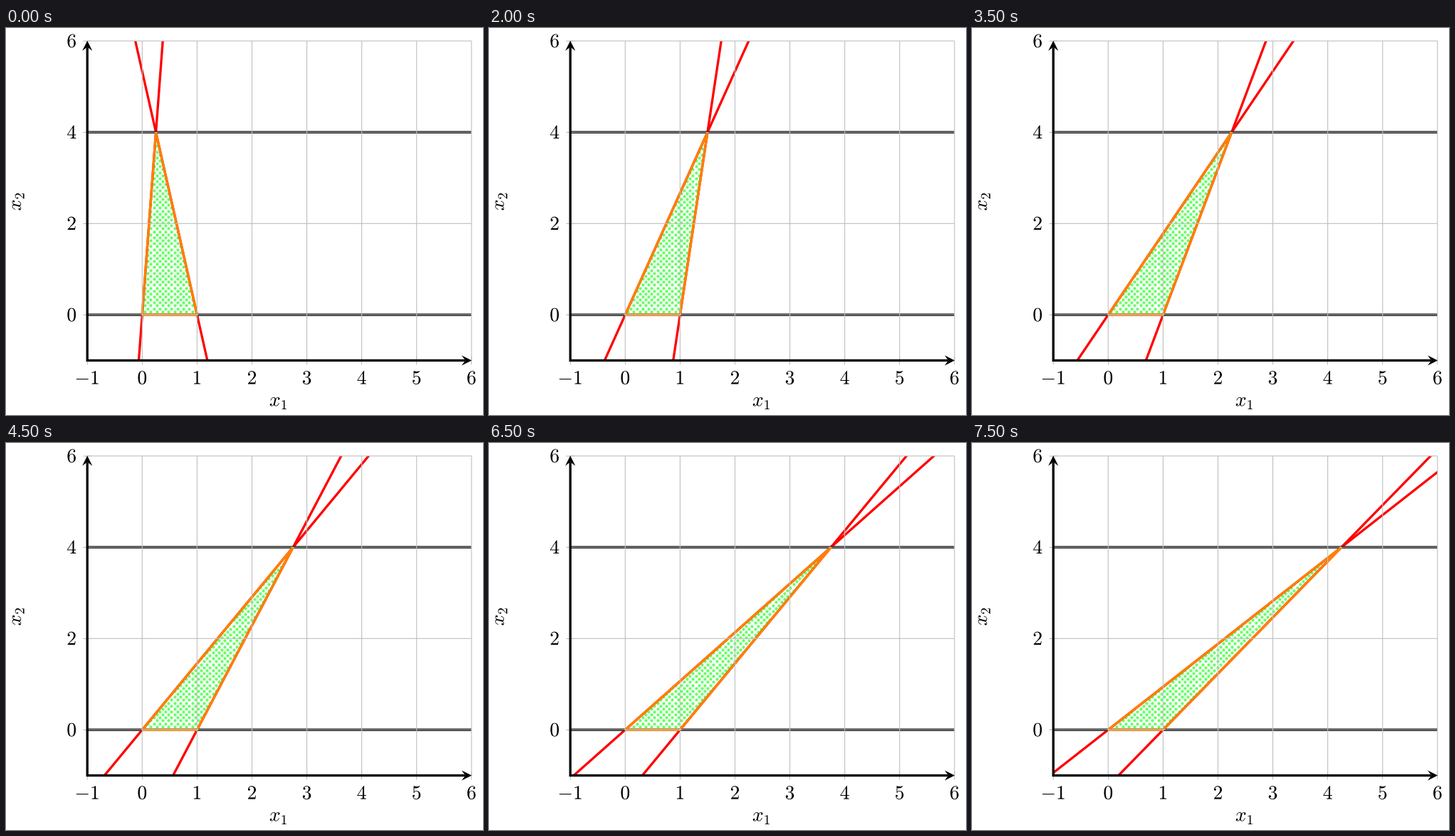
A matplotlib script that plays this animation: 670 by 543 pixels, repeating every 8000 ms.

```python
import numpy as np
import matplotlib.pyplot as plt
from matplotlib.animation import FuncAnimation
from matplotlib.patches import PathPatch, Polygon, Rectangle
from matplotlib.path import Path
from matplotlib.textpath import TextPath
from matplotlib.transforms import Affine2D

W, H, DPI = 670, 543, 100
PX = 72 / DPI                  # one pixel in points
PT = 200 / 72.27               # one TeX point in pixels
LEFT, TOP = 114.2, 18.15
RIGHT, BOTTOM = LEFT + 195 * PT, TOP + 162 * PT
THICK, THIN, HAIR = 1.2 * PT, 0.4 * PT, 0.2 * PT
GRID = "#bfbfbf"

# Apex positions; x = 1 is skipped because one side would be vertical.
APEX = [k / 4 for k in range(1, 18) if k != 4]

plt.rcParams["mathtext.fontset"] = "cm"
fig = plt.figure(figsize=(W / DPI, H / DPI), dpi=DPI, facecolor="white")
ax = fig.add_axes([0, 0, 1, 1])
ax.set_xlim(0, W)
ax.set_ylim(H, 0)
ax.axis("off")


def sx(x):
    return LEFT + (x + 1) * (RIGHT - LEFT) / 7


def sy(y):
    return BOTTOM - (y + 1) * (BOTTOM - TOP) / 7


def line(xs, ys, color, width, z):
    return ax.plot(xs, ys, color=color, lw=width * PX, zorder=z, snap=False,
                   solid_capstyle="butt", solid_joinstyle="bevel")[0]


def label(x, y, s, rotation=0):
    """Draw math text with its baseline starting at (x, y)."""
    glyphs = TextPath((0, 0), f"${s}$", size=10 * PT)
    place = Affine2D().scale(1, -1).rotate_deg(-rotation).translate(x, y)
    ax.add_patch(PathPatch(place.transform_path(glyphs), fc="black",
                           ec="none", snap=False, zorder=9))


def arrow_tip(x, y, dx, dy):
    u = 0.64 * PT
    shape = [(0, 0), (-8, 4), (-5, 0), (-8, -4)]
    pts = [(x + u * (a * dx - b * dy), y + u * (a * dy + b * dx))
           for a, b in shape]
    ax.add_patch(Polygon(pts, fc="black", ec="none", snap=False, zorder=8))


# Dotted fill: two interleaved square lattices.
step = 3 * PT
i, j = np.meshgrid(np.arange(22, 66), np.arange(16, 50))
gx, gy = i.ravel() * step, H - j.ravel() * step
dots = ax.scatter(np.r_[gx, gx + step / 2], np.r_[gy, gy - step / 2],
                  s=(4.2 * PX) ** 2, c="#66ff66", linewidths=0, zorder=1)

# Moving lines and the fixed horizontal bounds
box = Rectangle((LEFT, TOP), RIGHT - LEFT, BOTTOM - TOP, transform=ax.transData)
sides = [line([], [], "#ff0000", THICK, 2) for _ in range(2)]
for side in sides:
    side.set_clip_path(box)
for y in (0, 4):
    line([LEFT, RIGHT], [sy(y)] * 2, "black", THICK, 3)
outline = line([], [], "#ff8000", THICK, 4)

# Grid, ticks and labels
half = 2.13 * PT
digit, minus = 5 * PT, 7.78 * PT
for x in range(-1, 7):
    line([sx(x)] * 2, [BOTTOM - half, BOTTOM + half], "gray", HAIR, 5)
    line([sx(x)] * 2, [TOP, BOTTOM], GRID, THIN, 6)
    label(sx(x) - (digit + minus * (x < 0)) / 2, 499.7, x)
for y in (0, 2, 4, 6):
    line([LEFT - half, LEFT + half], [sy(y)] * 2, "gray", HAIR, 5)
    line([LEFT, RIGHT], [sy(y)] * 2, GRID, THIN, 6)
    label(LEFT - half - 3.33 * PT - digit, sy(y) + 3.22 * PT, y)
name = 10.2 * PT
label((LEFT + RIGHT - name) / 2, 530.5, "x_1")
label(21.1, (TOP + BOTTOM + name) / 2, "x_2", rotation=90)

# Axes
line([LEFT, LEFT, RIGHT - 9], [TOP + 9, BOTTOM, BOTTOM], "black", THICK,
     7).set_solid_joinstyle("miter")
arrow_tip(LEFT, TOP - 0.3, 0, -1)
arrow_tip(RIGHT + 0.3, BOTTOM, 1, 0)


def update(n):
    apex = APEX[n]
    for foot, side in enumerate(sides):
        slope = (apex - foot) / 4
        side.set_data([sx(foot + slope * y) for y in (-1.2, 6.2)],
                      [sy(-1.2), sy(6.2)])
    tri = [(sx(x), sy(y)) for x, y in ((apex, 4), (0, 0), (1, 0), (apex, 4))]
    outline.set_data(*zip(*tri))
    dots.set_clip_path(Path(tri), ax.transData)
    return [dots, outline, *sides]


anim = FuncAnimation(fig, update, frames=len(APEX), interval=500,
                     repeat=True, repeat_delay=0)
plt.show()
```
